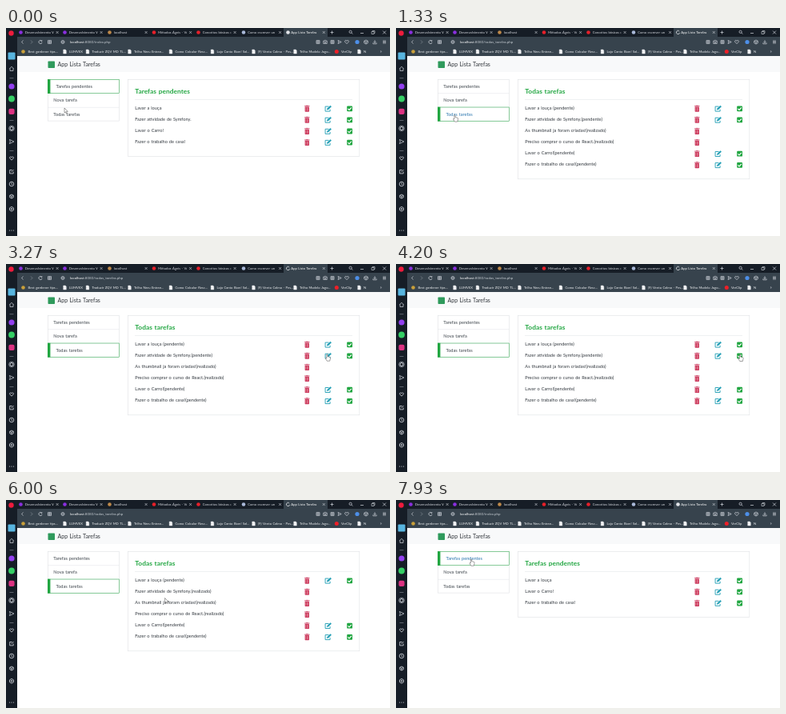
Recreate the animation shown at these times as an HTML page with a canvas. Size 480 by 260 pixels, loop 8000 ms.

```html
<!DOCTYPE html>
<html lang="pt-BR">
<head>
<meta charset="utf-8">
<title>App Lista Tarefas</title>
<style>
html, body { margin: 0; width: 480px; height: 260px; overflow: hidden; background: #fff; }
canvas { display: block; }
</style>
</head>
<body>
<canvas id="stage" width="480" height="260"></canvas>
<script>
const ctx = document.getElementById('stage').getContext('2d');
const LOOP = 8000, STEP = 1000 / 15;
const GREEN = '#21a641', RED = '#cb3a5e', TEAL = '#209db4';
const LINE = '#dfe2e5', PALE = '#d3d7de', LINK = '#2a76ae';
const DARK = '#161d26', BAR = '#37434d';

function rect(x, y, w, h, color) {
  ctx.fillStyle = color;
  ctx.fillRect(x, y, w, h);
}

function dot(x, y, r, color) {
  ctx.fillStyle = color;
  ctx.beginPath();
  ctx.arc(x, y, r, 0, 7);
  ctx.fill();
}

function box(x, y, w, h, r, color) {
  ctx.fillStyle = color;
  ctx.beginPath();
  ctx.roundRect(x, y, w, h, r);
  ctx.fill();
}

function frame(x, y, w, h, color, width = 0.6) {
  ctx.strokeStyle = color;
  ctx.lineWidth = width;
  ctx.strokeRect(x, y, w, h);
}

function path(x, y, d, color, width = 0.7, fill) {
  const p = new Path2D(d);
  ctx.save();
  ctx.translate(x, y);
  if (fill) { ctx.fillStyle = fill; ctx.fill(p); }
  ctx.strokeStyle = color;
  ctx.lineWidth = width;
  ctx.lineJoin = 'round';
  ctx.stroke(p);
  ctx.restore();
}

// Laid out ten times larger and scaled down, so advances stay fractional.
// Returns the x where the text ends.
function text(s, x, mid, size, color, weight = 400) {
  ctx.save();
  ctx.translate(x, mid + size * 0.35);
  ctx.scale(0.1, 0.1);
  ctx.font = `${weight} ${size * 10}px Lato, "Open Sans", sans-serif`;
  ctx.wordSpacing = `${size * 0.8}px`;
  ctx.fillStyle = color;
  ctx.fillText(s, 0, 0);
  const end = x + ctx.measureText(s).width / 10;
  ctx.restore();
  return end;
}

const ICON = {
  cross: 'M-1.5-1.5L1.5 1.5M1.5-1.5L-1.5 1.5',
  back: 'M1-2L-1 0L1 2',
  forward: 'M-1-2L1 0L-1 2',
  reload: 'M1.6-1.4A2.1 2.1 0 1 0 2.1 .4M1.9-2.4V-1H.5',
  grid: 'M-2-2H2V2H-2ZM0-2V2M-2 0H2',
  ring: 'M2 0A2 2 0 1 1-2 0A2 2 0 1 1 2 0',
  spinner: 'M1.6-1.4A2.1 2.1 0 1 0 2.1 .4',
  plane: 'M-2-2L2.2 0L-2 2L-1.2 0Z',
  heart: 'M0 2.2L-2.3-.2C-3-2.2-.6-2.8 0-1.1C.6-2.8 3-2.2 2.3-.2Z',
  camera: 'M-2.2-1.5H-1L-.5-2.2H.5L1-1.5H2.2V2H-2.2ZM.8 .2A.8 .8 0 1 1-.8 .2A.8 .8 0 1 1 .8 .2',
  cube: 'M0-2.5L2.3-1.2V1.3L0 2.5L-2.3 1.3V-1.2ZM-2.3-1.2L0 0L2.3-1.2M0 0V2.5',
  download: 'M0-2.3V1M-1.5-.5L0 1L1.5-.5M-2.2 1V2.3H2.2V1',
  menu: 'M-2-1.5H2M-2 0H2M-2 1.5H2',
  home: 'M-2.8 0L0-2.7L2.8 0M-2-.6V2.5H2V-.6',
  note: 'M.6-2H-2.3V2.4H2.2V0M-.5 .6L2.6-2.5',
  clock: 'M2.8 0A2.8 2.8 0 1 1-2.8 0A2.8 2.8 0 1 1 2.8 0M0-1.6V.2L1.2 1',
  gear: 'M0-2.9L2.5-1.4V1.4L0 2.9L-2.5 1.4V-1.4ZM1 0A1 1 0 1 1-1 0A1 1 0 1 1 1 0',
  search: 'M1.2-.5A1.6 1.6 0 1 1-2-.5A1.6 1.6 0 1 1 1.2-.5M.8 .7L2.3 2.2'
};
const icon = (name, x, y, color = PALE, width) => path(x, y, ICON[name], color, width);

const TABS = [
  ['Desenvolvimento W', 18.5, '#8b2fe0'], ['Desenvolvimento W', 73.5, '#8b2fe0'],
  ['localhost', 129.5, '#c08a4a'], ['Métodos Ágeis - Ve', 185, '#e8202a'],
  ['Conceitos básicos c', 240.5, '#e8202a'], ['Como escrever un', 297, '#a9b8d8'],
  ['App Lista Tarefas', 352.5, '#e2e5e9']
];
const BOOKMARKS = [
  ['Best gardener tips...', 27.5], ['LUMVEX', 79], ['Traduzir ZQV MD TL...', 107.5],
  ['Trilha Naru Entran...', 160], ['Como Calcular Resc...', 211.5],
  ['Loja Canto Bom! Sal...', 263.5], ['(9) Vento Calmo - Pes...', 315],
  ['Trilha Modelo Jogo...', 367], ['VerClip', 419], ['N', 447]
];

function drawTabs(waiting) {
  rect(0, 0, 480, 11, DARK);
  rect(347, 0, 55, 11, BAR);
  TABS.forEach(([title, x, color], i) => {
    const active = i === 6;
    if (active && waiting) icon('spinner', x, 5.5, color, 0.8);
    else dot(x, 5.5, 2.3, color);
    ctx.save();
    ctx.beginPath();
    ctx.rect(x + 3, 0, 38, 11);
    ctx.clip();
    text(title, x + (active ? 3.8 : 5.2), 5.5, 4.2, active ? '#fff' : '#d6d9df');
    ctx.restore();
    icon('cross', x + (active ? 44.8 : 45.6), 5.5, PALE, 0.6);
  });
  path(407.5, 5.5, 'M-2 0H2M0-2V2', PALE);
  icon('search', 431, 5.3);
  path(445, 6.5, 'M-2 0H2', PALE);
  path(459, 5.5, 'M-2-1H1V2H-2ZM-1-1V-2H2V1H1', PALE, 0.6);
  path(473, 5.5, 'M-2-2L2 2M2-2L-2 2', PALE);
}

function drawToolbar(page, loading) {
  rect(0, 11, 480, 24, BAR);
  icon('back', 20.5, 17.5);
  icon('forward', 32, 17.5, '#8a929b');
  icon(loading ? 'cross' : 'reload', 43, 17.5);
  icon('grid', 54.5, 17.5);
  icon('ring', 71, 17.5);
  path(71, 17.5, 'M-2 0H2M0-2V2', PALE, 0.4);
  const end = text('localhost', 80, 17.5, 4.5, '#fff');
  text(`:8080/${page}.php`, end, 17.5, 4.5, '#c3c9cf');
  ['grid', 'camera', 'grid', 'plane', 'heart'].forEach((n, i) => icon(n, 390 + i * 9, 17.5));
  dot(439, 17.5, 2.6, '#4d8fe8');
  icon('cube', 450, 17.5);
  icon('download', 461, 17.5);
  icon('menu', 473, 17.5);

  BOOKMARKS.forEach(([title, x], i) => {
    if (i === 0) dot(x - 6, 29.5, 2.3, '#c9a03a');
    else if (i === 8) dot(x - 5.7, 29.5, 2.5, '#ee2028');
    else path(x - 5.5, 29.5, 'M-1.8-2.5H.7L1.8-1.4V2.5H-1.8Z', '#f3f4f6', 0.4, '#f3f4f6');
    text(title, x, 29.5, 4.2, '#eceef0');
  });
  text('»', 467.5, 29.3, 5.2, PALE);
}

function drawSidebar() {
  rect(0, 0, 14, 260, DARK);
  dot(6.5, 6.5, 3.2, '#ee1c3c');
  box(2.5, 30.5, 9, 9, 1, '#58b5df');
  icon('home', 7, 51);
  for (const y of [62.5, 115, 153]) rect(4.5, y, 5, 0.6, '#8a8f99');
  dot(7, 73, 3.6, '#9340f0');
  dot(7, 88.5, 3.9, '#35cf65');
  box(3.4, 100.7, 7.2, 7.2, 2, '#dc3382');
  icon('ring', 7, 125.5, PALE, 1);
  path(7, 125.5, 'M3.3 0A3.3 3.3 0 1 1-3.3 0A3.3 3.3 0 1 1 3.3 0', PALE, 0.6);
  path(7, 142, 'M-2.6-2.6L3 0L-2.6 2.6L-1.7 0Z', PALE);
  [['heart', 163], ['note', 179.5], ['clock', 195], ['cube', 210.5], ['gear', 226.3]]
    .forEach(([n, y]) => icon(n, 7, y, PALE, 0.8));
  for (const x of [4.5, 7, 9.5]) dot(x, 253, 0.6, PALE);
}

const MENU = ['Tarefas pendentes', 'Nova tarefa', 'Todas tarefas'];

function drawMenu(active, hover) {
  frame(52.3, 64.3, 89, 51.8, LINE);
  MENU.forEach((label, i) => {
    const y = 64.3 + i * 17.3, on = i === active;
    if (i) rect(52.3, y, 89, 0.5, LINE);
    text(label, on ? 62.5 : 59.3, y + 8.7, 5.65, i === hover ? LINK : '#3f464d');
  });
  const y = 64.4 + active * 17.3;
  frame(52.3, y, 89, 17.3, GREEN, 0.5);
  rect(52, y - 0.2, 3.4, 17.7, GREEN);
}

function drawTrash(y) {
  rect(373.1, y - 3.5, 6.4, 0.9, RED);
  rect(375.1, y - 4, 2.4, 0.7, RED);
  box(373.6, y - 2.2, 5.4, 6.2, 0.7, RED);
  for (const x of [374.7, 376.1, 377.5]) rect(x, y - 1.1, 0.4, 4, '#f3b6bd');
}

function drawEdit(y) {
  path(402.5, y, 'M1-2.6H-3.4V3.4H2.6V1', TEAL, 0.9);
  path(402.5, y, 'M-1.4 1.4L-.8-.2L3-3.6L4.2-2.4L.4 1.2Z', TEAL, 0.4, TEAL);
}

function drawCheck(y) {
  box(426.2, y - 3.3, 6.8, 6.8, 0.9, GREEN);
  path(429.6, y + 0.2, 'M-2.2 0L-.6 1.6L2.3-1.5', '#fff', 1.1);
}

const TASKS = ['Lavar a louça', 'Fazer atividade de Symfony.', 'As thumbnail ja foram criadas!',
  'Preciso comprar o curso de React.', 'Lavar o Carro!', 'Fazer o trabalho de casa!'];

function drawTasks(all, finished) {
  const list = TASKS.map((name, i) => ({ name, done: finished.includes(i) }))
    .filter(task => all || !task.done);
  frame(152.3, 64.3, 289.5, 39.9 + list.length * 14.1, LINE);
  text(all ? 'Todas tarefas' : 'Tarefas pendentes', 161.3, 78.8, 8.4, GREEN, 700);
  rect(161, 89.4, 272, 0.5, LINE);
  list.forEach(({ name, done }, i) => {
    const y = 99.7 + i * 14.1;
    const gap = /\W$/.test(name) ? '' : ' ';
    const status = all ? `${gap}(${done ? 'realizado' : 'pendente'})` : '';
    text(name + status, 161.3, y, 5.65, '#343a40');
    drawTrash(y + 1);
    if (!done) { drawEdit(y + 1); drawCheck(y + 1); }
  });
}

// Pointer path: time, x, y
const PATH = [
  [0, 73, 100], [70, 73, 100], [270, 73.5, 107], [800, 73.5, 107], [870, 73.5, 108.5],
  [2270, 73.5, 108.5], [3070, 371, 118], [3130, 373, 118], [3270, 402, 112.5],
  [3930, 430, 113], [5670, 430, 113], [6000, 198.7, 122.5], [6200, 170, 127],
  [6470, 202.5, 116.5], [6930, 202.5, 116.5], [7270, 93.5, 76], [7530, 93.5, 76],
  [7600, 94, 73.6], [LOOP, 94, 73.6]
];
// Pointer shape from each time on
const SHAPES = [[0, 'arrow'], [200, 'hand'], [2330, 'arrow'], [3260, 'hand'], [3390, 'arrow'],
  [3860, 'hand'], [5730, 'arrow'], [6460, 'beam'], [6990, 'arrow'], [7530, 'hand']];

function pointerAt(t) {
  const i = Math.max(1, PATH.findIndex(p => p[0] >= t));
  const [t0, x0, y0] = PATH[i - 1], [t1, x1, y1] = PATH[i];
  const k = (t - t0) / (t1 - t0);
  return [x0 + (x1 - x0) * k, y0 + (y1 - y0) * k];
}

function drawPointer(t) {
  const [x, y] = pointerAt(t);
  const shape = SHAPES.findLast(s => s[0] <= t)[1];
  if (shape === 'arrow') {
    path(x, y, 'M0 0V6L1.4 4.8L2.4 7L3.4 6.5L2.4 4.4H4.3Z', '#444', 0.5, '#fff');
  } else if (shape === 'beam') {
    path(x, y, 'M-1.3-3.2H1.3M0-3.2V3.2M-1.3 3.2H1.3', '#333', 0.6);
  } else {
    path(x, y, 'M-.6 .6Q0-.4 .6 .6V3L3.6 3.8Q4.3 4.1 4 5.6L3.3 8.6H-.2L-2 5.6Q-2.2 4.4-.6 5.3Z',
      '#444', 0.5, '#fff');
  }
}

function draw(now) {
  const t = Math.floor(((now % LOOP) + 5) / STEP) * STEP % LOOP + 0.5;
  const within = (a, b) => t >= a && t < b;
  const all = within(1260, 7860);
  const loading = within(1195, 1260) || within(4260, 4390) || within(7590, 7860);
  const hover = within(200, 2330) ? 2 : t >= 7530 ? 0 : -1;
  const finished = t < 4325 ? [2, 3] : [1, 2, 3];
  rect(0, 0, 480, 260, '#fff');
  rect(14, 35, 466, 20, '#f8f9fa');
  drawTabs(all || loading);
  drawToolbar(all ? 'todas_tarefas' : 'index', loading);
  drawSidebar();
  box(52.5, 41.5, 8.5, 8.5, 0.8, '#2f9a5c');
  text('App Lista Tarefas', 64.5, 45.8, 7, '#33383d');
  drawMenu(all ? 2 : 0, hover);
  drawTasks(all, finished);
  drawPointer(t);
  requestAnimationFrame(draw);
}
requestAnimationFrame(draw);
</script>
</body>
</html>
```
